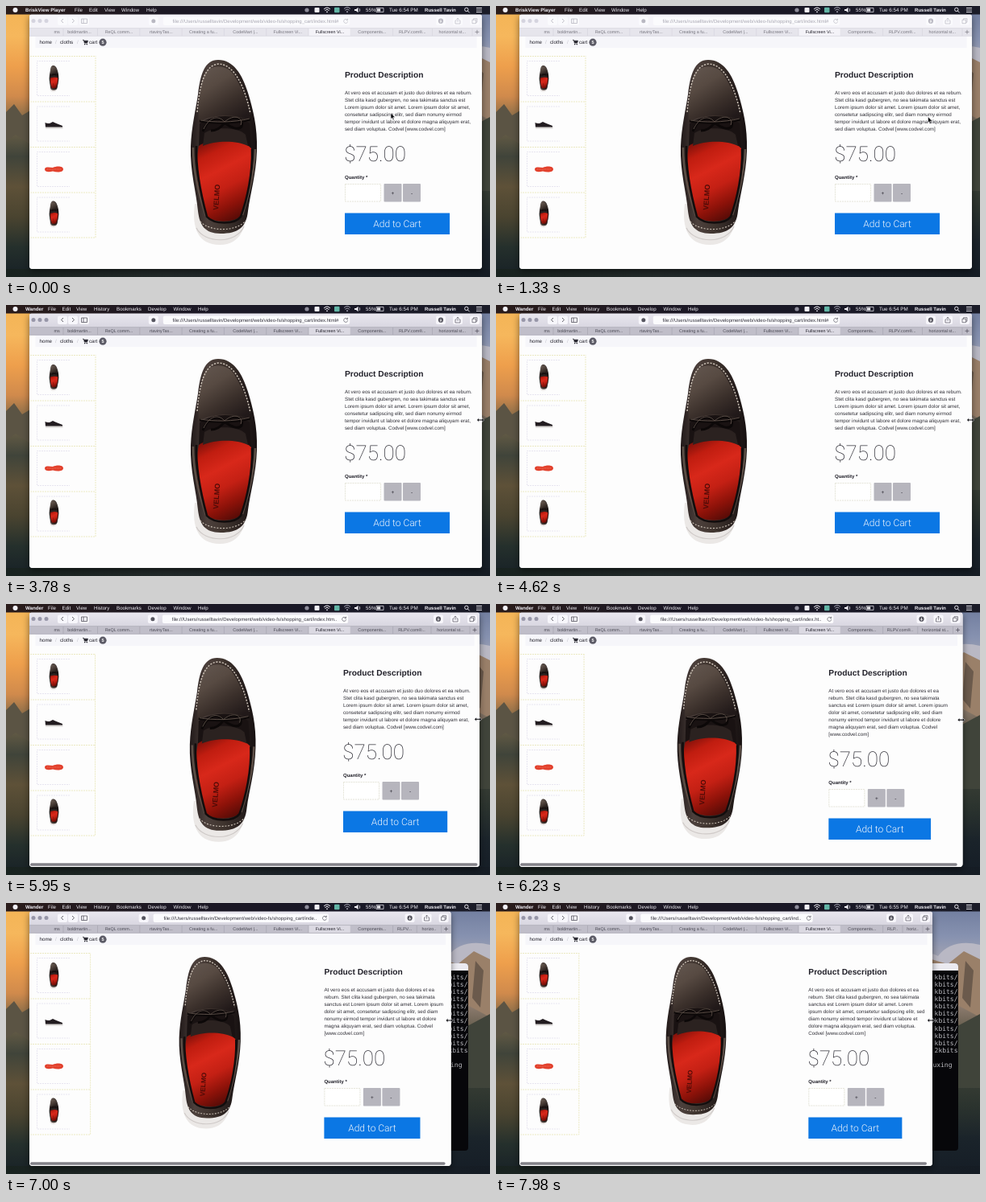
An HTML page with a canvas for the animation above (8000 ms loop, 600 by 337 pixels).

```html
<!DOCTYPE html>
<html lang="en">
<head>
<meta charset="utf-8">
<title>Shop window being resized</title>
<style>
html, body { margin: 0; width: 100%; height: 100%; overflow: hidden; background: #1b2226; }
canvas { display: block; width: 600px; height: 337px; }
</style>
</head>
<body>
<canvas id="stage"></canvas>
<script>
const LOOP = 8000, STEP = 70, LEFT = 29, FOCUS_AT = 3780, MINUTE_AT = 7490;
const SANS = '"Liberation Sans", Arial, sans-serif';
const THIN = 'Roboto, "Liberation Sans", sans-serif';
const MONO = '"DejaVu Sans Mono", monospace';
const INK = '#22212a';

const canvas = document.getElementById('stage');
const c = canvas.getContext('2d');
const dpr = window.devicePixelRatio || 1;
canvas.width = 600 * dpr;
canvas.height = 337 * dpr;

// [time, value] steps
const RIGHT_EDGE = [[5810, 590], [5950, 587], [6510, 570], [7000, 551.6], [7280, 544.5], [7630, 541]];
const POINTER_X = [[0, 477], [2520, 588]];
const POINTER_Y = [[0, 133], [2520, 142]];

const COPY = 'At vero eos et accusam et justo duo dolores et ea rebum. Stet clita kasd gubergren, ' +
  'no sea takimata sanctus est Lorem ipsum dolor sit amet. Lorem ipsum dolor sit amet, consetetur ' +
  'sadipscing elitr, sed diam nonumy eirmod tempor invidunt ut labore et dolore magna aliquyam erat, ' +
  'sed diam voluptua. Codvel [www.codvel.com]';
const ADDRESS = 'file:///Users/russelltavin/Development/web/video-fs/shopping_cart/index.html#';
const TABS = ['boldmartin...', 'ReQL comm...', 'rtavinyTas...', 'Creating a fu...', 'CodeMart |...',
  'Fullscreen Vi...', 'Fullscreen Vi...', 'Components...'];
const PLAYER_MENU = [['BriskView Player', 24], ['File', 85], ['Edit', 103], ['View', 122], ['Window', 143], ['Help', 174]];
const BROWSER_MENU = [['Wander', 24], ['File', 52], ['Edit', 69.5], ['View', 87], ['History', 109],
  ['Bookmarks', 137], ['Develop', 176], ['Window', 207.5], ['Help', 238]];

function at(steps, t) {
  if (t <= steps[0][0]) return steps[0][1];
  for (let i = 1; i < steps.length; i++) {
    const [t0, a] = steps[i - 1], [t1, b] = steps[i];
    if (t <= t1) return a + (b - a) * (t - t0) / (t1 - t0);
  }
  return steps[steps.length - 1][1];
}

function rect(x, y, w, h, fill, r = 0) {
  c.fillStyle = fill;
  c.beginPath();
  c.roundRect(x, y, w, h, r);
  c.fill();
}

function dot(x, y, r, fill) {
  c.fillStyle = fill;
  c.beginPath();
  c.arc(x, y, r, 0, 7);
  c.fill();
}

function fade(x0, y0, x1, y1, ...stops) {
  const g = c.createLinearGradient(x0, y0, x1, y1);
  stops.forEach((s, i) => g.addColorStop(i / (stops.length - 1), s));
  return g;
}

function text(s, x, y, size, { color = INK, weight = 400, family = SANS, align = 'left' } = {}) {
  c.font = `${weight} ${size}px ${family}`;
  c.textAlign = align;
  c.fillStyle = color;
  c.fillText(s, x, y);
}

function widthOf(s, size) {
  c.font = `100px ${SANS}`;
  return c.measureText(s).width * size / 100;
}

function clipText(s, size, max) {
  if (widthOf(s, size) <= max) return s;
  while (s && widthOf(s + '..', size) > max) s = s.slice(0, -1);
  return s + '..';
}

function wrap(s, size, max) {
  const lines = [''];
  for (const word of s.split(' ')) {
    const last = lines[lines.length - 1];
    const joined = last ? last + ' ' + word : word;
    if (widthOf(joined, size) <= max) lines[lines.length - 1] = joined;
    else lines.push(word);
  }
  return lines;
}

function path(d, fill, stroke, width = 1, dash = []) {
  const p = new Path2D(d);
  if (fill) { c.fillStyle = fill; c.fill(p); }
  if (stroke) {
    c.strokeStyle = stroke;
    c.lineWidth = width;
    c.setLineDash(dash);
    c.stroke(p);
    c.setLineDash([]);
  }
}

function dashed(d, color = '#e8e5b4') {
  path(d, null, color, .8, [2, 1]);
}

function wallpaper() {
  rect(0, 0, 600, 337, '#1b2226');
  rect(0, 0, 30, 337, fade(0, 0, 0, 337, '#f3b455', '#f6b75c', '#ee9f4c', '#d08a4c', '#6d6148', '#40443a', '#5e5138', '#4a4430', '#25302c', '#172026'));
  path('M0 132 L10 122 L20 136 L30 130 V172 L12 160 L0 168 Z', '#5b5444');
  rect(500, 0, 100, 337, fade(0, 0, 0, 337, '#6d7a9c', '#8792b0', '#b3aeb4', '#8f7d70', '#54503f', '#3b4036', '#2b332e', '#1a232a', '#151d26'));
  path('M500 74 Q525 54 548 66 Q565 44 600 52 V76 H500 Z', '#b9b8c4');
  path('M500 84 L540 70 L560 76 L580 60 L600 70 V142 L574 128 L548 140 L500 128 Z', '#9a8069');
  path('M548 84 L558 78 L566 116 L552 128 Z M582 72 L592 84 L588 130 L578 118 Z', '#6b5a4c');
  path('M500 150 L550 138 L574 152 L600 138 V230 H500 Z', '#40443a');
  rect(0, 327, 600, 10, fade(0, 0, 600, 0, '#18221f', '#232a2a', '#1a2129', '#151c24'));
}

function terminal() {
  rect(420, 75, 153, 233, '#07070a', 4);
  rect(420, 75, 153, 9, '#ebeaf0', [4, 4, 0, 0]);
  const ink = { color: '#bdbdc2', family: MONO, align: 'right' };
  for (let i = 0; i < 10; i++) text('kbits/', 572.5, 94.8 + i * 9.1, 8, ink);
  text('2kbits', 572.5, 185.8, 8, ink);
  text('muxing', 565.5, 204, 8, ink);
}

function menuBar(t, active) {
  const ink = '#f1f0f6';
  const label = (s, x, weight = 400, size = 6.2) => text(s, x, 7.4, size, { color: ink, weight });
  rect(0, 0, 600, 10.5, fade(0, 0, 600, 0, '#2a1c1a', '#1c1824', '#191826', '#1b1c28'));
  dot(11.5, 5, 3, ink);
  (active ? BROWSER_MENU : PLAYER_MENU).forEach(([s, x], i) => label(s, x, i ? 400 : 700));

  dot(373, 5, 2.6, '#8d8c9a');
  rect(382.5, 2, 6, 6, ink, 1);
  path('M394 4 Q398 0 402 4 M395.4 5.6 Q398 3 400.6 5.6', null, ink, 1);
  dot(398, 7.3, .9, ink);
  rect(407, 1.8, 6.5, 6.5, '#62b5a6', 1);
  path('M419 3.5 Q423 -.5 427 3.5 M420.3 5.3 Q423 2.5 425.7 5.3', null, '#a3a2b0', 1);
  dot(423, 7.2, 1, '#a3a2b0');
  path('M432 4 H434 L436.5 1.8 V8.2 L434 6 H432 Z', ink);
  path('M438 3 Q439.6 5 438 7', null, ink, .7);
  label('55%', 446);
  path('M459 2.5 H468 V7.5 H459 Z', null, ink, .7);
  rect(460, 3.5, 4.2, 3, ink);
  label(t < MINUTE_AT ? 'Tue 6:54 PM' : 'Tue 6:55 PM', 475, 400, 6.3);
  label('Russell Tavin', 519, 700, 6.1);
  path('M573 4.4 A2.2 2.2 0 1 1 568.6 4.4 A2.2 2.2 0 1 1 573 4.4 M572.4 6 L574.6 8.3', null, ink, .9);
  path('M583 2.5 H590 M583 5 H590 M583 7.5 H590', null, ink, .9);
}

function toolbar(right, active) {
  const w = right - LEFT, mid = LEFT + w / 2, half = w * .183;
  const x0 = mid - half - 12, x1 = mid + half + 14;
  const ink = active ? '#56555f' : '#b9b8c2';
  const button = x => rect(x - 6, 13.5, 12, 10.5, active ? '#f7f6fb' : '#fafafd', 2);
  rect(LEFT, 10, w, 17.5, active ? fade(0, 10, 0, 27, '#e9e7ef', '#d9d7e1') : '#f5f4f9', [4, 4, 0, 0]);
  [34, 42, 50].forEach(x => dot(x, 18.5, 2.5, active ? '#9796a8' : '#d5d4df'));
  [70, 83, 97, x0 - 12].forEach(button);
  path('M71 16 L68.5 18.5 L71 21 M82 16 L84.5 18.5 L82 21', null, ink, .9);
  path('M93.5 16 H100.5 V21.5 H93.5 Z M96 16 V21.5', null, ink, .8);
  dot(x0 - 12, 18.7, 2.5, ink);

  rect(x0, 13.5, x1 - x0, 10.5, '#fbfbfd', 2);
  text(clipText(ADDRESS, 6, half * 2 + 1), mid, 21, 6, { color: active ? '#34333d' : '#a9a8b3', align: 'center' });
  c.save();
  c.translate(mid + half + 9, 18.7);
  path('M2 -1.4 A2.5 2.5 0 1 0 2.5 .6 M2.4 -3 V-1 H.4', null, ink, .7);
  c.restore();

  [right - 51, right - 30, right - 9].forEach(button);
  c.save();
  c.translate(right, 18.7);
  dot(-51, 0, 3.1, ink);
  path('M-51 -1.7 V1.5 M-52.3 .3 L-51 1.6 L-49.7 .3', null, '#fff', .8);
  path('M-31.5 -.7 H-33 V3.3 H-27 V-.7 H-28.5 M-30 1 V-3.5 M-31.5 -2.1 L-30 -3.6 L-28.5 -2.1', null, ink, .7);
  path('M-12 -1.5 H-7.5 V3 H-12 Z M-10.5 -1.5 V-3 H-6 V1.5 H-7.5', null, ink, .7);
  c.restore();
}

function tabBar(right, active) {
  const color = active ? '#4b4a55' : '#77767f';
  const last = (right - 12 - 479) / 2;
  const tabs = TABS.map((label, i) => [label, i ? 87.7 + 52.3 * i : 91, 46]);
  tabs.push(['RLPV.com®...', 479 + last / 2, last - 10], ['horizontal st...', 479 + last * 1.5, last - 10]);
  rect(LEFT, 27.5, right - LEFT, 10, active ? '#c0bec9' : '#e6e5ec');
  rect(375, 27.5, 53, 10, active ? '#dbd9e2' : '#f4f3f8');
  text('ms', 63, 34.3, 5.4, { color, align: 'center' });
  tabs.forEach(([label, x, max], i) =>
    text(clipText(label, 5.4, max), x, 34.3, 5.4, { color: i === 6 ? INK : color, align: 'center' }));
  let lines = `M71 28 V37 M${479 + last} 28 V37 M${right - 12} 28 V37 M${LEFT} 27.6 H${right} M${LEFT} 37.3 H${right}`;
  for (let i = 0; i < 8; i++) lines += `M${113.5 + 52.3 * i} 28 V37`;
  path(lines, null, active ? '#a3a1ae' : '#d3d2dc', .6);
  path(`M${right - 8.5} 32.3 h5 m-2.5 -2.5 v5`, null, color, .7);
}

function shoe(x, y, scale) {
  const thread = '#c9bfb4';
  c.save();
  c.translate(x, y);
  c.scale(scale, scale);
  c.translate(-270, -67);
  path('M234 246 C230 276 238 297 265 297 C291 297 300 274 298 244 Z', '#ebe8e6');
  path('M236 276 C246 296 286 296 295 274', null, '#cfcac8', 1.2);
  path('M263 67 C282 67 293 85 300 108 C306 128 312 150 311 180 C310 210 303 232 300 255 C298 275 288 283 266 283 C246 283 240 272 238 255 C236 232 228 205 229 175 C230 150 235 130 238 110 C241 85 246 67 263 67 Z',
    fade(229, 0, 311, 0, '#211919', '#4c403c', '#40352f', '#2b2220', '#171111'));
  path('M246 84 C254 72 276 72 284 88 C296 108 302 126 303 142 C284 134 258 134 239 144 C238 124 241 98 246 84 Z',
    fade(246, 74, 288, 142, '#62564f', '#574a42', '#3b302b', '#211919'));
  path('M237 132 C240 98 246 73 264 72 C283 73 296 100 303 134', null, thread, 1.5, [2.2, 1.6]);
  path('M240 146 C257 134 287 134 302 146 L304 178 C288 166 255 166 239 177 Z', '#191212');
  path('M239 174 C253 164 292 164 304 177 C306 205 299 237 292 260 C284 270 257 270 248 261 C240 234 233 202 239 174 Z',
    fade(240, 166, 292, 266, '#6c0d08', '#c01d10', '#d8281a', '#c42014', '#8c1209', '#4c0a06'));
  path('M246 158 C257 150 288 150 297 160 L300 174 C286 167 260 167 244 174 Z', '#2b2220');
  path('M232 176 C232 206 240 238 248 261 M309 178 C308 210 299 240 293 260', null, '#5c4e46', 2.6);
  path('M236 174 C235 206 243 240 249 262 C258 272 284 272 291 262 C299 240 306 208 305 178', null, '#120d0d', 2.6);
  path('M240 143 C258 146 282 146 303 141 M271 145 C262 135 250 141 244 156 M271 145 C282 135 296 139 292 150 C288 155 278 151 271 145 C267 151 262 155 254 155', null, '#0c0808', 3);
  path('M241 142 C258 145 282 145 302 140 M271 144 C262 134 251 140 245 153 M271 144 C282 134 295 138 291 148', null, '#62554d', .9);
  path('M241 268 C252 281 286 281 297 267', null, thread, 1.1, [2, 1.8]);
  c.translate(263, 254);
  c.rotate(-1.5);
  text('VELMO', 0, 0, 9, { color: '#4f0b07', weight: 700 });
  c.restore();
}

function thumbnails(w) {
  const right = LEFT + w / 6 - 11.5;
  for (let i = 0; i < 4; i++) {
    const y = 62.5 + i * 56.5;
    dashed(`M30 ${y} H${right}`);
    dashed(`M79 ${y + 6} H38.5 V${y + 49} H79`, '#e2e0ee');
  }
  dashed(`M30 288 H${right} V62`);
  shoe(59.5, 74, .142);
  path('M48.5 145 C52 147 55 146 58 144 C61 146 66 147 70 149 L70 151 H49 Z', '#221c20');
  path('M49 150.5 H70.5 V152.5 H49 Z', '#d9d6d4');
  path('M48 203 C48 199.5 54 200.5 58 201 C63 198.5 71 199 71 203 C71 207 63 207 58 205.5 C53 207 48 206.5 48 203 Z', '#e2402c');
  path('M51 203 H68', null, '#f0806a', .8, [1, 1]);
  shoe(59.5, 242.5, .142);
}

function details(w) {
  const x = LEFT + w * 2 / 3 + 17;
  const lines = wrap(COPY, 6.23, w / 3 - 26.2);
  const dy = (lines.length - 6) * 9;
  text('Product Description', x, 89.3, 10.2, { weight: 700 });
  lines.forEach((line, i) => text(line, x, 110.3 + i * 9, 6.23, { color: '#2f2e36' }));

  c.save();
  c.translate(x, dy);
  text('$75.00', -.8, 193, 26, { weight: 100, family: THIN });
  text('Quantity *', 0, 215.3, 6, { weight: 700 });
  rect(.5, 221.5, 44, 21.5, '#fff');
  dashed('M.5 221.5 H44.5 V243 H.5 Z', '#dfddd0');
  [['+', 48.5], ['-', 72]].forEach(([sign, left]) => {
    rect(left, 221, 22, 22.5, '#b6b5bd', 1);
    text(sign, left + 11, 234.6, 6.5, { align: 'center' });
  });
  const bw = .286 * w - 30.4;
  rect(0, 257.5, bw, 26.5, '#0b77e4');
  text('Add to Cart', bw / 2, 274.8, 12, { weight: 300, family: THIN, color: '#f6f8fc', align: 'center' });
  c.restore();
}

function page(right) {
  const w = right - LEFT;
  rect(LEFT, 37.5, w, 289.5, '#fdfdfd', [0, 0, 4, 4]);
  rect(36.5, 37.5, w - 14, 14.5, '#f6f6fa');
  const slash = { color: '#c3c2cc' };
  text('home', 41.5, 47.3, 6.2);
  text('/', 61, 47.3, 6.2, slash);
  text('cloths', 67, 47.3, 6.2);
  text('/', 88, 47.3, 6.2, slash);
  path('M95 42.3 H96.3 L97.3 46 H100.6 L101.5 43.2 H96.8', INK, INK, .7);
  dot(97.7, 47.6, .8, INK);
  dot(100.3, 47.6, .8, INK);
  text('cart', 103, 47.3, 6.2);
  dot(120, 45.2, 4.6, '#5c5b66');
  text('5', 120, 47.2, 5.5, { weight: 700, color: '#fff', align: 'center' });
  thumbnails(w);
  shoe(LEFT + w * .449 - 10.9, 67, (230 - (561 - w) * .43) / 230);
  details(w);
}

function pointer(t, right, active) {
  c.save();
  if (active) {
    c.translate(right - 1.8, 143 + 3 * Math.min(1, (590 - right) / 30));
    path('M-4.5 0 L-2 -2.4 V-.8 H2 V-2.4 L4.5 0 L2 2.4 V.8 H-2 V2.4 Z', '#0b0b0e', '#f6f6fa', .5);
  } else {
    c.translate(at(POINTER_X, t), at(POINTER_Y, t));
    path('M0 0 V7.5 L1.7 6 L2.9 8.7 L4.1 8.2 L2.9 5.6 H5.3 Z', '#0b0b0e', '#f6f6fa', .5);
  }
  c.restore();
}

function draw(t) {
  const right = at(RIGHT_EDGE, t), active = t >= FOCUS_AT;
  c.setTransform(dpr, 0, 0, dpr, 0, 0);
  c.textRendering = 'geometricPrecision';
  wallpaper();
  terminal();
  c.save();
  c.shadowColor = 'rgba(0,0,0,.5)';
  c.shadowBlur = 8 * dpr;
  c.shadowOffsetY = 3 * dpr;
  rect(LEFT, 10, right - LEFT, 317, '#fdfdfd', 4);
  c.restore();
  page(right);
  toolbar(right, active);
  tabBar(right, active);
  if (right < 590) rect(30, 322.3, right - 37 + Math.max(0, 6 - (590 - right) / 2), 3.4, '#828188', 2);
  menuBar(t, active);
  pointer(t, right, active);
}

const start = performance.now();
function tick() {
  const t = (performance.now() - start) % LOOP;
  draw(Math.floor(t / STEP) * STEP);
  requestAnimationFrame(tick);
}
tick();
</script>
</body>
</html>
```
